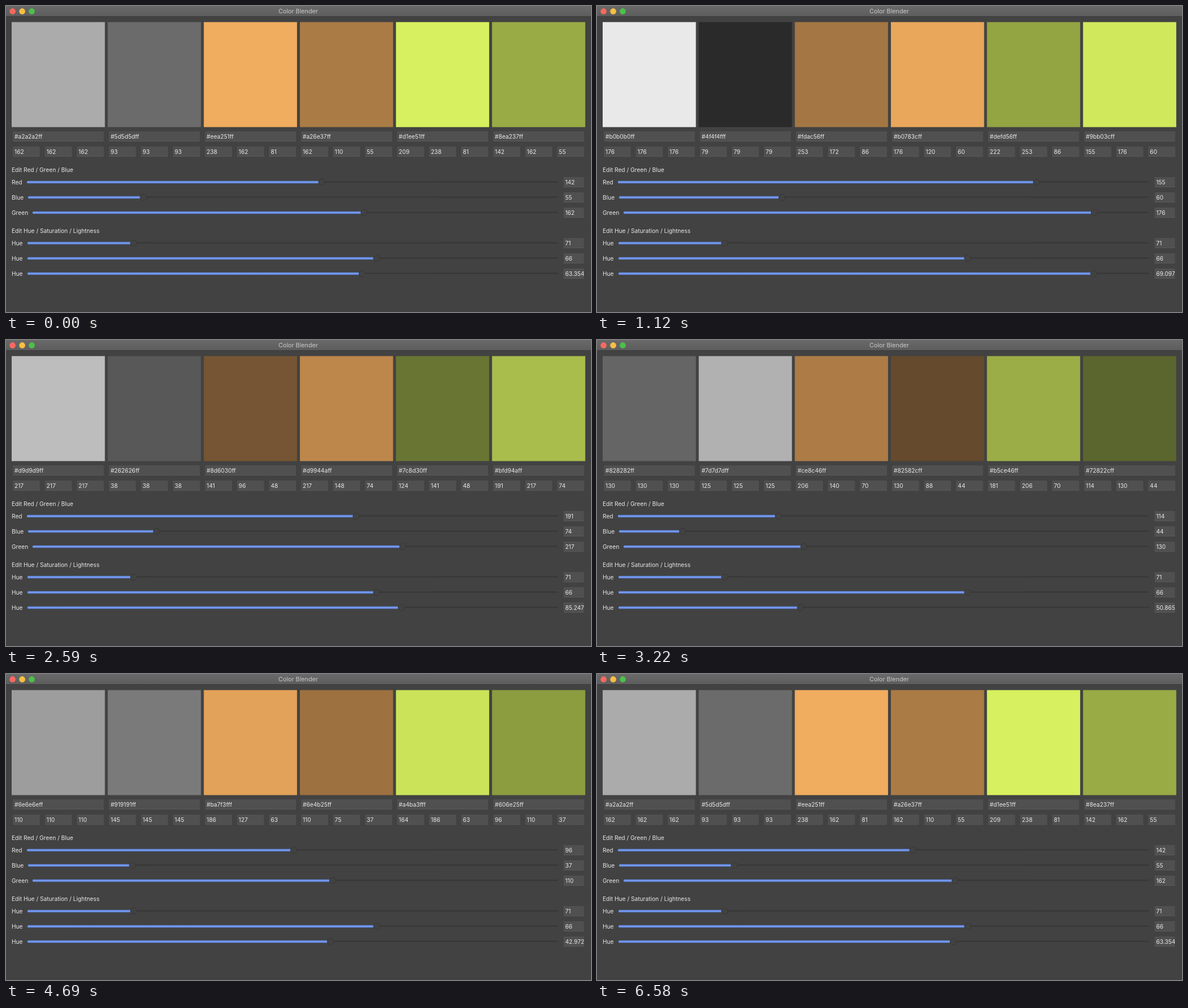
An HTML page for the animation above (6650 ms loop, 1033 by 542 pixels).

```html
<!DOCTYPE html>
<html lang="en">
<head>
<meta charset="utf-8">
<title>Color Blender</title>
<style>
  html, body { margin: 0; width: 100%; height: 100%; overflow: hidden; background: #424242; }
  svg { display: block; width: 1033px; height: 542px; }
  text { font: 10.2px Inter, "Open Sans", sans-serif; fill: #e8e8e8; white-space: pre; }
  .title { font-size: 10.8px; fill: #c9c9c9; text-anchor: middle; }
</style>
</head>
<body>
<svg id="stage" viewBox="0 0 1033 542" xmlns="http://www.w3.org/2000/svg">
  <defs>
    <linearGradient id="bar" x2="0" y2="1">
      <stop stop-color="#696969"/><stop offset="1" stop-color="#5d5d5d"/>
    </linearGradient>
    <linearGradient id="blue" x2="0" y2="1">
      <stop stop-color="#5577c4"/><stop offset=".5" stop-color="#7ca2f8"/><stop offset="1" stop-color="#5577c4"/>
    </linearGradient>
    <clipPath id="valueClip"><rect x="985" y="300" width="35.5" height="190"/></clipPath>
  </defs>
  <rect width="1033" height="542" fill="#424242"/>
  <rect width="1033" height="18.5" fill="url(#bar)"/>
  <rect y="18.2" width="1033" height=".8" fill="#383838"/>
  <circle cx="11.6" cy="9.4" r="5.3" fill="#f9695f"/>
  <circle cx="28.6" cy="9.4" r="5.3" fill="#f7bf43"/>
  <circle cx="45.5" cy="9.4" r="5.3" fill="#4cc04b"/>
  <text class="title" x="516" y="13.4">Color Blender</text>
  <text x="10" y="293.7">Edit Red / Green / Blue</text>
  <text x="10" y="401.7">Edit Hue / Saturation / Lightness</text>
</svg>
<script>
const LOOP = 6650, STEP = 70, TEXT_LAG = 280, PITCH = 169.65;
const HUE = 71, SATURATION = 0.661;

// Brightness over time: [ms, value]
const PATH = [
  [0, .63354], [490, .63354], [840, .69097], [1120, .902], [1400, .993], [1610, .993],
  [1820, .9845], [2100, .93], [2940, .50865], [3220, .342], [3640, .11577],
  [3780, .1], [3920, .1555], [4970, .63354], [LOOP, .63354]
];

const stage = document.getElementById('stage');

function add(tag, attrs, content) {
  const node = document.createElementNS('http://www.w3.org/2000/svg', tag);
  for (const key in attrs) node.setAttribute(key, attrs[key]);
  if (content) node.textContent = content;
  return stage.appendChild(node);
}

function addField(x, y, width, clip) {
  add('rect', { x, y: y - 9, width, height: 18, fill: '#505050' });
  add('rect', { x, y: y + 8.2, width, height: .8, fill: '#5a5a5a' });
  const attrs = { x: x + 2.8, y: y + 3.8 };
  if (clip) attrs['clip-path'] = 'url(#valueClip)';
  return add('text', attrs);
}

const columns = Array.from({ length: 6 }, (_, i) => {
  const x = 10 + PITCH * i;
  return {
    swatch: add('rect', { x, y: 28.5, width: 164.6, height: 186 }),
    hex: addField(x + 2.2, 231, 160.5),
    channels: [0, 1, 2].map(c => addField(x + 2.2 + c * PITCH / 3, 258, 47.5))
  };
});

const sliders = [
  ['Red', 312, 37], ['Blue', 339, 39], ['Green', 366, 47],
  ['Hue', 420, 38], ['Hue', 447, 38], ['Hue', 474, 38]
].map(([label, y, start]) => {
  add('text', { x: 10, y: y + 3.8 }, label);
  add('rect', { x: start, y: y - 1.8, width: 975 - start, height: 3.6, rx: 1.8, fill: '#393939' });
  add('rect', { x: start, y: y + 1.4, width: 975 - start, height: .6, fill: '#4a4a4a' });
  return {
    start,
    fill: add('rect', { x: start, y: y - 2.3, height: 4.6, rx: 1.5, fill: 'url(#blue)' }),
    knob: add('circle', { cy: y, r: 5.6, fill: '#424242', stroke: '#363636', 'stroke-width': 1 }),
    value: addField(984.6, y, 36, true)
  };
});

const slope = i => (PATH[i + 1][1] - PATH[i][1]) / (PATH[i + 1][0] - PATH[i][0]);

// Flat at extremes, harmonic mean elsewhere, so the curve never overshoots
function tangent(i) {
  if (i === 0 || i === PATH.length - 1) return 0;
  const a = slope(i - 1), b = slope(i);
  return a * b <= 0 ? 0 : 2 * a * b / (a + b);
}

function brightness(time) {
  const t = Math.max(0, time);
  let i = 0;
  while (i < PATH.length - 2 && t >= PATH[i + 1][0]) i++;
  const [t0, v0] = PATH[i], [t1, v1] = PATH[i + 1];
  const span = t1 - t0, u = (t - t0) / span, w = 1 - u;
  return v0 * w * w * (1 + 2 * u) + v1 * u * u * (3 - 2 * u)
    + span * u * w * (w * tangent(i) - u * tangent(i + 1));
}

function hsv(hue, s, v) {
  return [5, 3, 1].map(n => {
    const k = (n + hue / 60) % 6;
    return 255 * v * (1 - s * Math.max(0, Math.min(k, 4 - k, 1)));
  });
}

function palette(v) {
  const partner = v + .3 > 1 ? v - .3 : v + .3;
  return [
    hsv(0, 0, v), hsv(0, 0, 1 - v),
    hsv(31, SATURATION, partner), hsv(31, SATURATION, v),
    hsv(HUE, SATURATION, partner), hsv(HUE, SATURATION, v)
  ];
}

// Screen tone curve: slightly raised shadows and midtones
function tone(channel) {
  const x = channel / 255;
  return Math.round(255 * x ** .87 + 18 * (1 - x) ** 8);
}

const hexText = rgb => '#' + rgb.map(c => Math.round(c).toString(16).padStart(2, '0')).join('') + 'ff';

function render(time) {
  const v = brightness(time), shownV = brightness(time - TEXT_LAG);
  const colors = palette(v), shown = palette(shownV);

  columns.forEach(({ swatch, hex, channels }, i) => {
    swatch.setAttribute('fill', `rgb(${colors[i].map(tone)})`);
    hex.textContent = hexText(shown[i]);
    channels.forEach((node, c) => { node.textContent = Math.round(shown[i][c]); });
  });

  const [r, g, b] = colors[5];
  const [textR, textG, textB] = shown[5].map(Math.round);
  const levels = [r / 255, b / 255, g / 255, HUE / 360, SATURATION, v];
  const values = [textR, textB, textG, HUE, 66, (shownV * 100).toFixed(5)];
  sliders.forEach(({ start, fill, knob, value }, i) => {
    const x = start + 5 + levels[i] * (963 - start);
    fill.setAttribute('width', Math.max(0, x - 5 - start));
    knob.setAttribute('cx', x);
    value.textContent = values[i];
  });
}

const origin = performance.now();
function tick() {
  const time = (performance.now() - origin) % LOOP;
  render(Math.floor(time / STEP) * STEP);
  requestAnimationFrame(tick);
}
tick();
</script>
</body>
</html>
```
